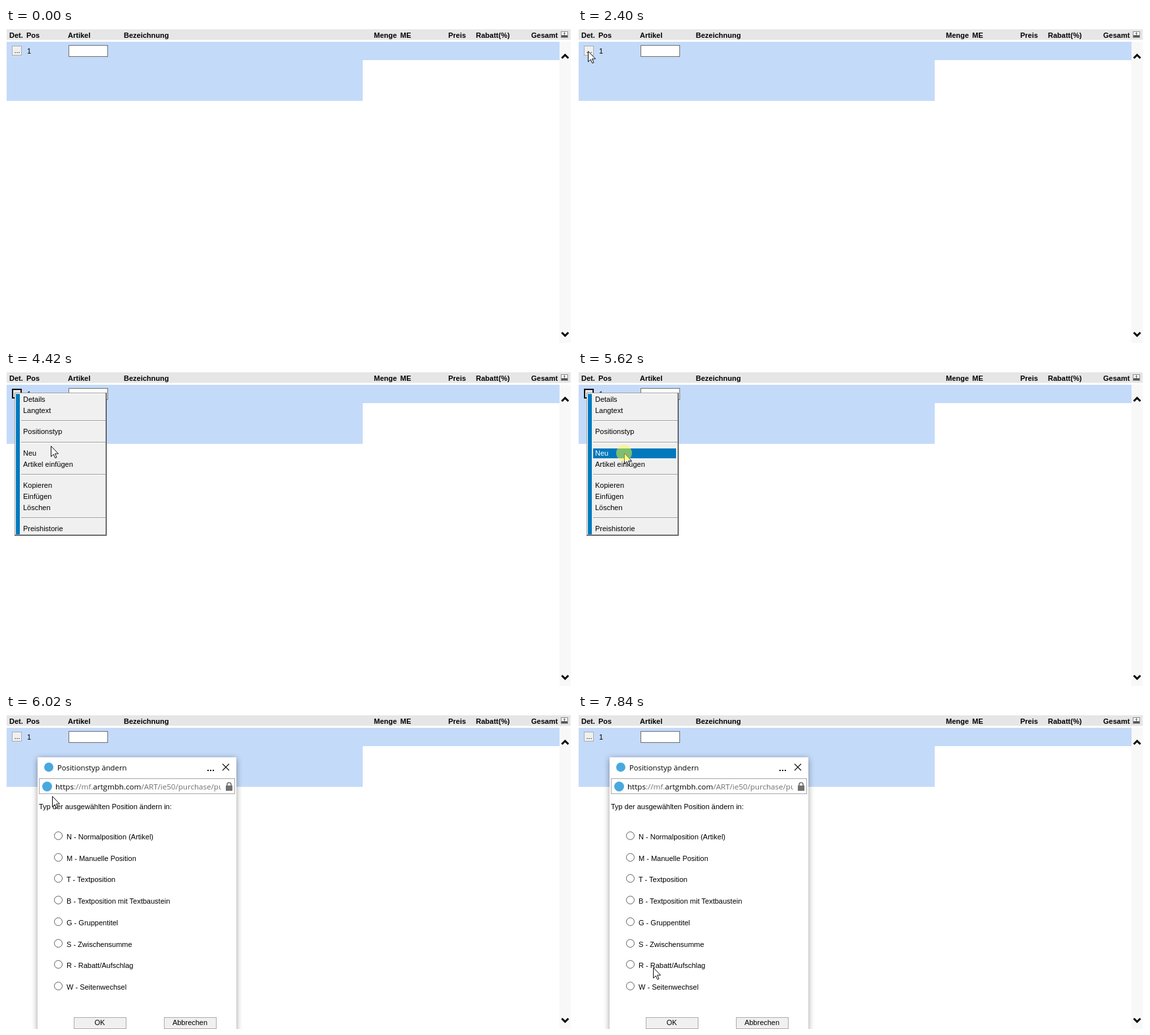
An HTML page for the animation above (8000 ms loop, 860 by 480 pixels).

```html
<!DOCTYPE html>
<html lang="de">
<head>
<meta charset="utf-8">
<style>
  html, body { margin: 0; width: 860px; height: 480px; overflow: hidden; background: #fff; }
  svg { display: block; font: 11px "Liberation Sans", Arial, sans-serif; }
  text { white-space: pre; }
  rect { shape-rendering: crispEdges; }
  .bold { font-weight: bold; }
  .ui { font-family: "Open Sans", "Noto Sans", sans-serif; }
  #window { filter: drop-shadow(0 2px 5px rgba(0, 0, 0, .4)); }
</style>
</head>
<body>
<svg id="stage" width="860" height="480" viewBox="0 0 860 480"></svg>
<script>
const LOOP = 8000, BLUE = '#0079bd';

// Pointer positions: time, x, y; each is held until the next
const path = [
  [800, 658, 362], [1000, 500, 290], [1200, 290, 190], [1400, 130, 112],
  [1600, 54, 73], [1800, 25, 49], [2000, 20, 42], [2200, 16, 37], [2400, 15, 35],
  [3620, 22, 42], [3820, 38, 60], [4020, 52, 84], [4220, 62, 102],
  [4420, 68, 114], [4620, 70, 123], [4820, 70, 125],
  [6420, 80, 138], [6620, 106, 175], [6820, 138, 225], [7020, 152, 275],
  [7240, 138, 325], [7440, 118, 361], [7640, 115, 378], [7840, 114, 386]
];
const clicks = [[3020, 3220], [5620, 5820]];

const menu = [
  ['Details', 47], ['Langtext', 64], ['Positionstyp', 96], ['Neu', 129],
  ['Artikel einfügen', 146], ['Kopieren', 178], ['Einfügen', 195],
  ['Löschen', 212], ['Preishistorie', 244]
];
const types = [
  'N - Normalposition (Artikel)', 'M - Manuelle Position', 'T - Textposition',
  'B - Textposition mit Textbaustein', 'G - Gruppentitel', 'S - Zwischensumme',
  'R - Rabatt/Aufschlag', 'W - Seitenwechsel'
];
const columns = [
  ['Det.', 5], ['Pos', 31], ['Artikel', 94], ['Bezeichnung', 179], ['Menge', 559],
  ['ME', 599], ['Preis', 672], ['Rabatt(%)', 714], ['Gesamt', 798]
];

const rect = (x, y, w, h, fill, more = '') =>
  `<rect x="${x}" y="${y}" width="${w}" height="${h}" fill="${fill}" ${more}/>`;
const box = (x, y, w, h, fill, line) =>
  rect(x, y, w, h, line) + rect(x + 1, y + 1, w - 2, h - 2, fill);
const text = (s, x, y, more = '') => `<text x="${x}" y="${y}" ${more}>${s}</text>`;
const line = (d, color, width = 1) =>
  `<path d="${d}" fill="none" stroke="${color}" stroke-width="${width}"/>`;
const dot = (x, y, r) => `<circle cx="${x}" cy="${y}" r="${r}" fill="#4aa8de"/>`;
const button = (s, x) => box(x, 462, 80, 18, '#f0f0f0', '#adadad') +
  text(s, x + 39.5, 474, 'text-anchor="middle"');

function tableSvg() {
  return rect(1, 2, 857, 16, '#e6e6e6') +
    columns.map(([s, x]) => text(s, x, 15, 'class="bold"')).join('') +
    box(843, 5, 11, 10, '#f8f8f8', '#909090') + rect(844, 11, 9, 3, '#555') +
    line('M848.5 6V11M847 8.5H850', '#777') +
    rect(1, 21, 840, 28, '#c4daf9') + rect(1, 49, 541, 62, '#c4daf9') +
    rect(841, 21, 17, 459, '#f8f8f8') +
    line('M844.5 46L849.5 41L854.5 46M844.5 464L849.5 469L854.5 464', '#000', 3) +
    box(9, 27, 15, 15, '#f0f0f0', '#adadad') + text('...', 12.5, 38) +
    `<g id="focus">${box(9, 27, 15, 15, '#111', '#111')}${rect(11, 29, 11, 11, '#e6e6e6')}</g>` +
    text('1', 32, 39) + box(95, 26, 60, 18, '#fff', '#707070');
}

function menuSvg() {
  return '<g id="menu">' +
    rect(13, 33, 140, 218, '#404040') + rect(13, 33, 139, 217, '#a0a0a0') +
    rect(14, 34, 137, 215, '#fff') + rect(15, 35, 136, 214, '#f0f0f0') +
    rect(15, 35, 6, 214, BLUE) +
    [75, 108, 157, 223].map(y => rect(23, y, 128, 1, '#a0a0a0') + rect(23, y + 1, 128, 1, '#fff')).join('') +
    rect(23, 36, 126, 15, BLUE, 'id="hover"') +
    menu.map(([s, y]) => text(s, 26, y, 'class="item"')).join('') + '</g>';
}

function dialogSvg() {
  const radios = types.map((s, i) => {
    const y = Math.round(191 + 32.7 * i);
    return `<circle cx="79.5" cy="${y - 5.5}" r="6" fill="#fff" stroke="#606060"/>` + text(s, 92, y);
  });
  const grey = s => `<tspan fill="#707070">${s}</tspan>`;
  return '<g id="dialog">' + rect(48, 66, 302, 430, '#fff', 'id="window"') +
    dot(65, 81, 7) +
    text('Positionstyp ändern', 78, 86, 'class="ui" font-size="11.3"') +
    [306, 310, 314].map(x => rect(x, 85, 2, 2, '#111')).join('') +
    line('M329 76L339 86M339 76L329 86', '#111', 1.1) +
    box(50, 98, 298, 24, '#fff', '#a8a8a8') + dot(62.5, 110.5, 7.5) +
    '<clipPath id="address"><rect x="75" y="99" width="252" height="22"/></clipPath>' +
    text('https' + grey('://mf.') + 'artgmbh.com' + grey('/ART/ie50/purchase/pu'), 75, 115,
      'class="ui" font-size="11.6" clip-path="url(#address)"') +
    rect(334, 109, 10, 8, '#707070') + line('M336 110V107.5a3 3 0 0 1 6 0V110', '#707070', 1.6) +
    text('Typ der ausgewählten Position ändern in:', 50, 145) +
    radios.join('') + button('OK', 103) + button('Abbrechen', 240) + '</g>';
}

const $ = id => document.getElementById(id);
$('stage').innerHTML = tableSvg() + menuSvg() + dialogSvg() +
  '<path id="pointer" d="M.5 .5V16.5L4.2 13L6.8 18.6L9 17.6L6.5 12H11.5Z" fill="#fff" stroke="#111"/>' +
  '<circle id="click" r="12" fill="#ffff28" opacity=".5"/>';
const items = [...document.querySelectorAll('.item')];

const show = (id, on) => $(id).setAttribute('display', on ? 'inline' : 'none');
const within = (t, from, to) => t >= from && t < to;

function draw(now) {
  const t = now % LOOP;
  const [, x, y] = path.filter(p => p[0] <= t).pop() || [0, -50, -50];
  const active = menu.findIndex(([, base]) => within(y, base - 12, base + 5));

  show('focus', within(t, 3020, 5820));
  show('menu', within(t, 3220, 5820));
  show('dialog', t >= 6020);
  show('click', clicks.some(([from, to]) => within(t, from, to)));
  show('hover', active >= 0);
  if (active >= 0) $('hover').setAttribute('y', menu[active][1] - 11);
  items.forEach((el, i) => el.setAttribute('fill', i === active ? '#fff' : '#000'));
  for (const id of ['pointer', 'click']) $(id).setAttribute('transform', `translate(${x} ${y})`);
  requestAnimationFrame(draw);
}
requestAnimationFrame(draw);
</script>
</body>
</html>
```
